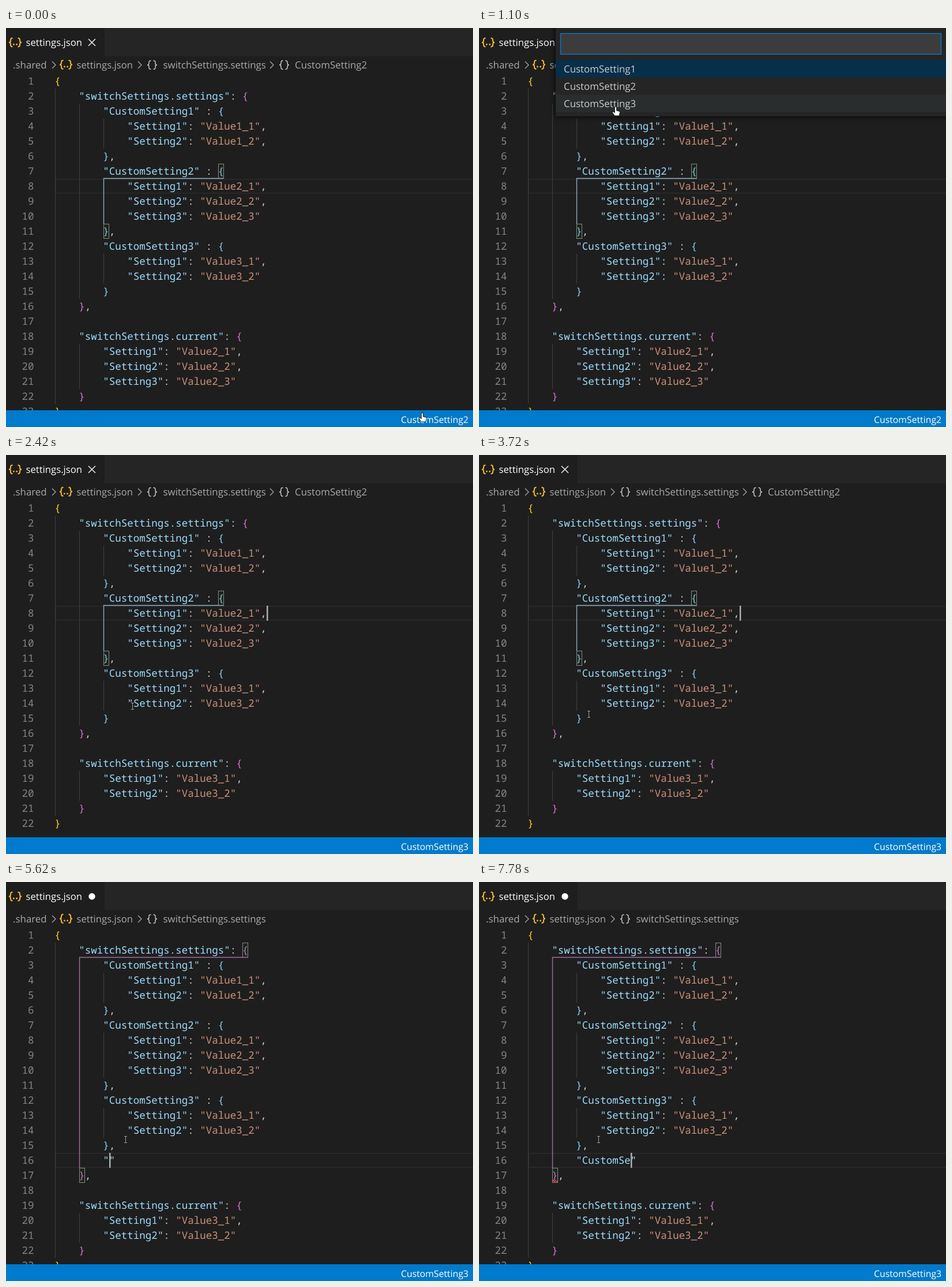
An HTML page that plays this animation: 810 by 691 pixels, repeating every 8 s.

```html
<!DOCTYPE html>
<html lang="en">
<head>
<meta charset="utf-8">
<title>Settings editor</title>
<style>
  html, body { margin: 0; width: 100%; height: 100%; overflow: hidden; background: #1e1e1e; }
  svg { display: block; width: 100%; height: 100%; }
  text { white-space: pre; text-rendering: geometricPrecision; }
  .code { font: 500 17.5px "Noto Sans Mono", monospace; }
  .ui { font-family: "Open Sans", sans-serif; }
  .shadow { filter: drop-shadow(0 0 5px #000); }
</style>
</head>
<body>
<svg id="stage" viewBox="0 0 810 691"></svg>
<script>
const LOOP = 8000, CHAR = 10.5, ROW = 26;
const stage = document.getElementById('stage');
const bracketColors = ['#ffd700', '#da70d6', '#87cefa'];

// Moments of the session, in ms
const HOVER = 130, OPEN = 390, CLOSE = 1230, SWITCH = 1380, RECOLOR = 1690;
const CLICK = 3930, CRUMB = 4300, COMMA = 4870, ENTER = 5180, CRUMB_CUT = 5470;
const QUOTES = 5620, ERROR = 5920;
const word = 'CustomSe';
const keyTimes = [6490, 6780, 6920, 7070, 7070, 7210, 7510, 7780];
const caretResets = [1340, CLICK, COMMA, ENTER, QUOTES, ...keyTimes];

const mousePath = [
  [0, 722, 667], [130, 722, 667], [260, 717, 662], [400, 717, 662],
  [580, 610, 480], [730, 350, 220], [860, 240, 134], [1230, 234, 140],
  [1650, 234, 140], [1980, 262, 270], [2300, 222, 430], [2420, 206, 456],
  [2650, 206, 456], [2860, 199, 452], [3300, 199, 452], [3600, 190, 448],
  [3900, 190, 448], [4200, 207, 445], [LOOP, 207, 445]
];

const colX = c => 85 + CHAR * c;
const rowY = r => 79 + ROW * (r - 1);
const rect = (x, y, w, h, fill, extra = '') =>
  `<rect x="${x}" y="${y}" width="${w}" height="${h}" fill="${fill}" ${extra}/>`;
const path = (d, stroke, width = 1, extra = '') =>
  `<path d="${d}" fill="none" stroke="${stroke}" stroke-width="${width}" ${extra}/>`;
const label = (x, y, size, fill, str) =>
  `<text class="ui" x="${x}" y="${y}" font-size="${size}" fill="${fill}">${str}</text>`;

function mouseAt(t) {
  t = Math.floor(t / 145) * 145;
  const i = mousePath.findIndex(p => p[0] > t);
  const [t0, x0, y0] = mousePath[i - 1], [t1, x1, y1] = mousePath[i];
  const k = (t - t0) / (t1 - t0);
  return [Math.round(x0 + (x1 - x0) * k), Math.round(y0 + (y1 - y0) * k)];
}

function blinkOn(t) {
  const last = caretResets.filter(m => m <= t).pop();
  return last !== undefined && Math.floor((t - last) / 500) % 2 === 0;
}

function values(group, count, indent, lastComma) {
  return Array.from({ length: count }, (_, i) =>
    ' '.repeat(indent) + `"Setting${i + 1}": "Value${group}_${i + 1}"` +
    (i < count - 1 || lastComma ? ',' : ''));
}

function documentRows(t) {
  const rows = ['{', '    "switchSettings.settings": {'];
  [2, 3, 2].forEach((count, i) => {
    const n = i + 1;
    rows.push(`        "CustomSetting${n}" : {`, ...values(n, count, 12, n === 1),
      '        }' + (n < 3 || t >= COMMA ? ',' : ''));
  });
  if (t >= ENTER) {
    const typed = word.slice(0, keyTimes.filter(k => k <= t).length);
    rows.push('        ' + (t >= QUOTES ? `"${typed}"` : ''));
  }
  rows.push('    },', '    ', '    "switchSettings.current": {',
    ...(t < SWITCH ? values(2, 3, 8) : values(3, 2, 8)), '    }', '}');
  return rows;
}

function codeRow(str, r, t) {
  const indent = str.match(/^ */)[0].length;
  const plain = r === 21 && t >= SWITCH && t < RECOLOR;
  const spans = (str.trim().match(/"[^"]*"|[{}]|[^"{}]+/g) || []).map(tok => {
    let fill = '#d4d4d4';
    if (tok[0] === '"') fill = tok.startsWith('"Value') ? '#ce9178' : '#9cdcfe';
    else if (/[{}]/.test(tok) && !plain) fill = bracketColors[indent / 4];
    return `<tspan fill="${fill}">${tok}</tspan>`;
  }).join('');
  let out = '';
  for (let c = 0; c < indent; c += 4) {
    const active = c === 8 && (t < CLICK ? r > 7 && r < 11 : t < ENTER && r > 12 && r < 15);
    out += rect(Math.floor(colX(c)), rowY(r), 1, ROW, active ? '#707070' : '#404040');
  }
  const base = rowY(r) + 19;
  return out +
    `<text class="code" x="48.5" y="${base}" text-anchor="end" fill="#858585">${r}</text>` +
    `<text class="code" x="${colX(indent) - .7}" y="${base}">${spans}</text>`;
}

function scope(r1, c1, r2, c2, color) {
  const box = (r, c) =>
    rect(Math.floor(colX(c)) + .5, rowY(r) + .5, 9, 25, 'rgba(0,100,0,.1)', 'stroke="#888"');
  const x = Math.floor(colX(c2)) + .5, y = rowY(r1 + 1) - .5;
  return box(r1, c1) + box(r2, c2) + path(`M${colX(c1) + 9} ${y}H${x}V${rowY(r2)}`, color, 1.4);
}

function editor(t) {
  const caretRow = t < CLICK ? 8 : t < ENTER ? 15 : 16;
  const rows = documentRows(t);
  let out = rect(86, rowY(caretRow) + 1, 730, 24, 'none', 'stroke="#282828" stroke-width="2"');
  out += rows.map((s, i) => codeRow(s, i + 1, t)).join('');

  const blue = '#8cafc2', purple = '#a56ca4';
  if (t < CLICK) out += scope(7, 27, 11, 8, blue);
  else if (t < COMMA) out += scope(12, 27, 15, 8, blue);
  else out += scope(2, 31, t < ENTER ? 16 : 17, 4, purple);
  if (t >= ERROR) out += path('M127 519l2-2 2 2 2-2 2 2 2-2', '#f14c4c', 1.3);

  if (blinkOn(t)) {
    const row = rows[caretRow - 1];
    const col = caretRow === 16 && t >= QUOTES ? row.length - 1 : row.length;
    out += rect(colX(col) - .5, rowY(caretRow), 2.5, ROW, '#aeafad');
  }
  return out;
}

// Pair of braces centred on x, y; gap is half the inner distance
function braces(x, y, gap, color, width) {
  const half = s => `M${x + s * gap} ${y - 7.5}q${s * 3.5} 0 ${s * 3.5} 3v1.5q0 3 ${s * 3} 3` +
    `q${-s * 3} 0 ${-s * 3} 3v1.5q0 3 ${-s * 3.5} 3`;
  return path(half(-1) + half(1), color, width);
}

function jsonIcon(x, y) {
  const dot = dx => `<circle cx="${x + dx}" cy="${y + 3.5}" r="1.4" fill="#f2b822"/>`;
  return braces(x, y, 4.5, '#f2b822', 2) + dot(-2.6) + dot(2.6);
}

function header(t) {
  const grey = '#a9a9a9';
  const chevron = x => path(`M${x - 3} 58l6 6-6 6`, grey, 1.3);
  let out = rect(0, 0, 810, 49, '#252526') + rect(0, 0, 171, 49, '#1e1e1e');
  out += jsonIcon(16, 25) + label(34.5, 31, 16.7, '#fff', 'settings.json');
  out += t < COMMA
    ? path('M143 19l12 12M155 19l-12 12', '#e8e8e8', 1.6)
    : '<circle cx="149" cy="25" r="5.7" fill="#fff"/>';
  out += label(12, 70, 16.9, grey, '.shared') + chevron(83) + jsonIcon(104, 63.5);
  out += label(122.5, 70, 16.7, grey, 'settings.json') + chevron(232);
  out += braces(253.5, 64, 2, '#c5c5c5', 1.5) + label(272.5, 70, 16.9, grey, 'switchSettings.settings');
  if (t < CRUMB_CUT) {
    out += chevron(461) + braces(482.5, 64, 2, '#c5c5c5', 1.5);
    out += label(501, 70, 16.9, grey, 'CustomSetting' + (t < CRUMB ? 2 : 3));
  }
  return out;
}

function palette(t, mouse) {
  let out = `<g class="shadow">${rect(133, -10, 690, 163, '#252526')}</g>`;
  out += rect(141.5, 9.5, 660, 36, '#3c3c3c', 'stroke="#007fd4" stroke-width="1.3"');
  if ((t - OPEN) % 1000 < 500) out += rect(148, 15, 1, 25, '#ccc');
  for (let i = 0; i < 3; i++) {
    const top = 55.5 + 30 * i;
    const hover = mouse[1] >= top && mouse[1] < top + 30;
    if (i === 0 || hover) out += rect(133, top, 677, 30, i ? '#2a2d2e' : '#062f4a');
    out += label(147, top + 21, 16.9, '#ccc', 'CustomSetting' + (i + 1));
  }
  return out;
}

function statusBar(t, mouse) {
  let out = rect(0, 662, 810, 29, '#007acc');
  if (t >= HOVER && mouse[1] > 655) out += rect(679, 662, 131, 29, '#fff', 'opacity=".12"');
  return out + label(685, 684, 15.8, '#fff', 'CustomSetting' + (t < SWITCH ? 2 : 3));
}

function pointer(t, [x, y]) {
  if (t >= CLOSE) {
    return path(`M${x - 2} ${y - 4.5}h5m-2.5 0v11m-2.5 0h5`, '#a0a0a0', 1);
  }
  return `<path transform="translate(${x} ${y})" fill="#fff" stroke="#111" stroke-width=".9"
    d="M-1.6 1Q-1.6-.6 0-.6T1.6 1V6L6.3 7.2Q7.6 7.6 7.4 9.4L6 15H-1.6L-5.6 9.6Q-6 8 -4.4 8L-1.6 9.6Z"/>`;
}

let shown = '';
function render(t) {
  const mouse = mouseAt(t);
  const picture = rect(0, 0, 810, 691, '#1e1e1e') + editor(t) + header(t) +
    (t >= OPEN && t < CLOSE ? palette(t, mouse) : '') +
    statusBar(t, mouse) + pointer(t, mouse);
  if (picture !== shown) stage.innerHTML = shown = picture;
}

const start = performance.now();
function tick() {
  render((performance.now() - start) % LOOP);
  requestAnimationFrame(tick);
}
tick();
</script>
</body>
</html>
```
